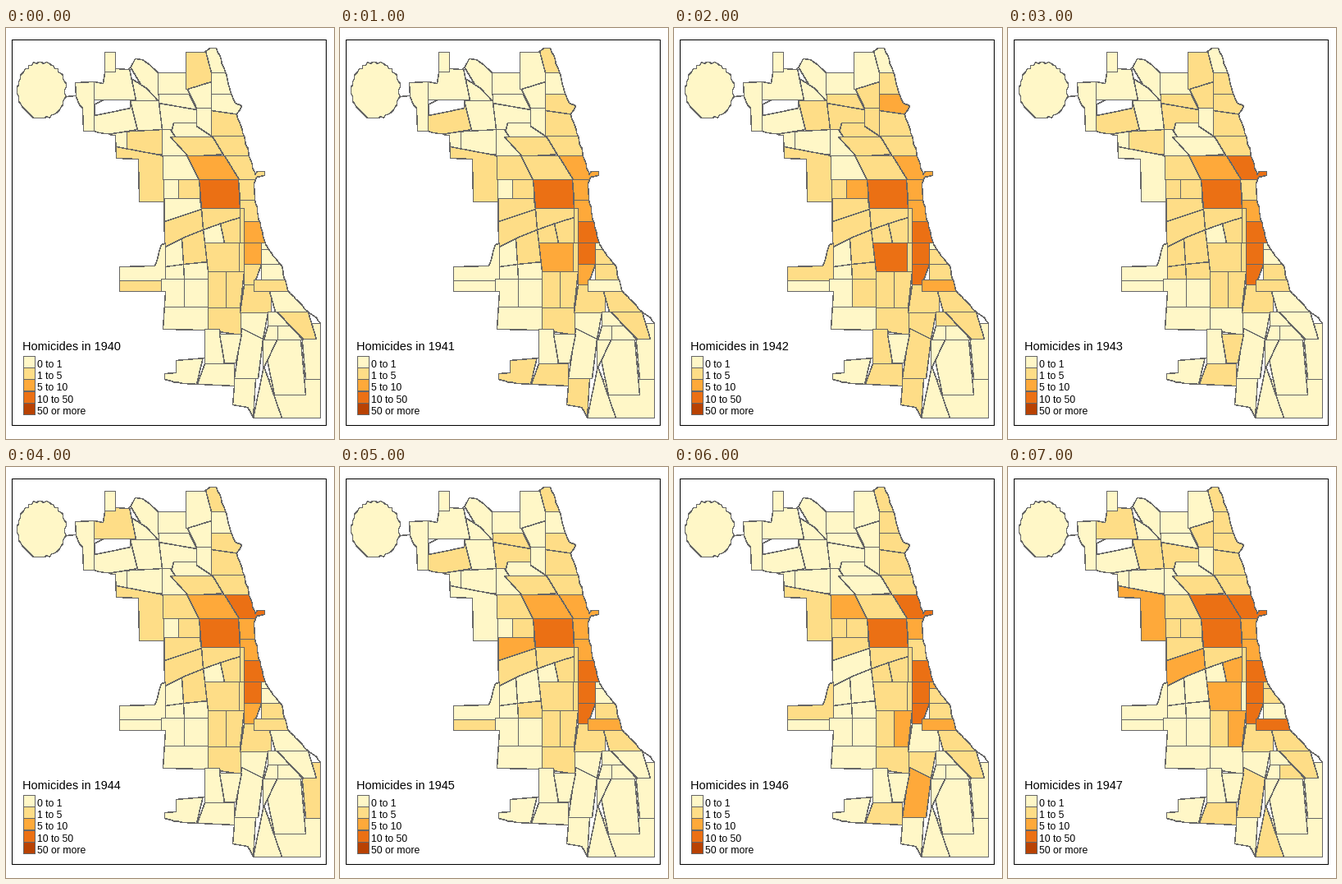
A matplotlib script that plays this animation: 400 px wide and 500 px high, repeating every 8 s.

```python
import numpy as np
import matplotlib.pyplot as plt
from matplotlib.animation import FuncAnimation
from matplotlib.patches import Polygon, Rectangle

PALETTE = ["#FFF7C7", "#FEDD87", "#FEA93A", "#EB7014", "#B84203"]
LABELS = ["0 to 1", "1 to 5", "5 to 10", "10 to 50", "50 or more"]
EDGE = "#666666"
PX = 0.72  # one pixel in points at 100 dpi
THIN = dict(lw=0.4 * PX, aa=False, snap=False)  # drawn one pixel wide
rng = np.random.default_rng(4)

fig = plt.figure(figsize=(4, 5), dpi=100, facecolor="white")
ax = fig.add_axes([0, 0, 1, 1])
ax.set_xlim(0.5, 400.5)
ax.set_ylim(500.5, 0.5)
ax.axis("off")


def add(points, fill, edge=EDGE, **kw):
    return ax.add_patch(Polygon(points, fc=fill, ec=edge, **THIN, **kw))


def box(x, y, w, h, fill, edge):
    ax.add_patch(Rectangle((x, y), w, h, fc=fill, ec=edge, **THIN))


def label(x, y, text, px):
    return ax.text(x, y, text, family="Liberation Sans", size=px * PX)


def roughen(points):
    """Break slanted sides into short, slightly uneven steps."""
    out = []
    for p, q in zip(points, points[1:] + points[:1]):
        (x0, y0), (x1, y1) = p, q
        out.append(p)
        if min(abs(x1 - x0), abs(y1 - y0)) > 3:
            for t in np.arange(5, np.hypot(x1 - x0, y1 - y0) - 3, 5):
                t /= np.hypot(x1 - x0, y1 - y0)
                dx, dy = rng.uniform(-1, 1, 2)
                out.append((x0 + t * (x1 - x0) + dx, y0 + t * (y1 - y0) + dy))
    return out


# City limits, clockwise from the north-west; every district is clipped to them
inland_north = [(85, 67), (108, 66), (119, 68), (121, 55), (121, 30),
                (134, 30), (134, 50), (150, 51), (158, 38), (167, 39),
                (186, 55), (220, 55), (220, 30), (243, 30)]
shore = [(249, 25), (257, 25), (268, 54), (275, 80), (280, 92), (288, 95),
         (282, 105), (291, 132), (297, 157), (304, 179), (307, 175),
         (316, 175), (316, 180), (306, 182), (303, 190), (304, 209),
         (308, 228), (314, 254), (321, 270), (337, 290), (344, 320),
         (369, 346), (379, 353), (384, 360), (384, 475)]
inland_south = [(302, 475), (295, 462), (277, 459), (279, 436), (216, 433),
                (194, 428), (194, 421), (208, 420), (208, 405), (243, 402),
                (243, 368), (192, 367), (195, 321), (139, 321), (139, 291),
                (182, 290), (190, 264), (194, 263), (193, 212), (163, 212),
                (162, 160), (135, 159), (134, 131), (108, 126), (95, 126),
                (94, 98), (86, 84)]
city = add(roughen(inland_north + shore + inland_south), "none", zorder=3)
areas = {}


def row(top, bottom, edges, numbers):
    """Lay districts side by side. An edge given as a pair runs from its
    first x at the top to its second at the bottom; a top or bottom given
    as a pair slopes from the left end to the right end."""
    count = len(edges)
    xs = [np.broadcast_to(e, 2) for e in edges]
    y0, y1 = (np.linspace(*np.broadcast_to(y, 2), count) for y in (top, bottom))
    for i, number in enumerate(numbers):
        j = i + 1
        quad = [(xs[i][0], y0[i]), (xs[j][0], y0[j]),
                (xs[j][1], y1[j]), (xs[i][1], y1[i])]
        areas[number] = add(quad, PALETTE[0])
        areas[number].set_clip_path(city)


# The detached airfield in the north-west and the road to it
turn = np.linspace(0, 2 * np.pi, 60, endpoint=False)
swell = 1 + rng.uniform(-0.04, 0.04, 60)
field = np.c_[44 + 29 * swell * np.cos(turn), 76 + 34 * swell * np.sin(turn)]
add(np.round(field / 2) * 2, PALETTE[0])
add([(73, 84), (86, 83)], "none")

# Districts, by city number; later rows overlap earlier ones
row(60, 127, [80, 108], [76])
row(36, 91, [(145, 178), 187], [12])
row((63, 74), 90, [(155, 152), (172, 187)], [11])
row(50, 88, [108, (151, 159)], [10])
row(30, 54, [119, 134], [9])
row(94, (133, 124), [108, 161], [17])
row(89, 125, [(152, 161), (187, 191)], [15])
row(54, 82, [186, (222, 224)], [13])
row((129, 124), (144, 155), [130, 148, 192], [18, 19])
row((144, 156), 212, [130, 193], [25])

row(91, 124, [(187, 191), 233], [16])
row(81, (92, 100), [187, (224, 233)], [14])
row(116, 133, [(205, 201), 252], [21])
row(124, 157, [191, (201, 223)], [20])
row(133, (157, 154), [(201, 223), (252, 267)], [22])
row(25, 75, [220, 251], [2])
row((75, 66), 98, [(222, 233), 251], [4])
row(98, (120, 132), [233, 251], [5])
row(25, 55, [(243, 251), 290], [1])
row(55, 81, [251, 290], [77])
row(81, 107, [251, 300], [3])
row((101, 108), 132, [251, 300], [6])
row(132, 157, [(252, 267), 310], [7])

row(156, 185, [192, (221, 236), (267, 285), 325], [23, 24, 8])
row(185, 208, [193, 211, 237], [26, 27])
row(185, 220, [(236, 239), (284, 286)], [28])
row(185, 210, [(284, 286), 320], [32])
row(210, 236, [286, 320], [33])
row(208, (236, 221), [194, (237, 239)], [29])
row((236, 221), (267, 246), [194, (239, 241)], [30])
row(220, (246, 231), [(239, 241), 286], [31])
row((246, 231), 262, [(241, 243), (262, 267), 286], [59, 60])
row(220, 262, [286, 291], [34])

row(262, 308, [130, 195], [56])
row(308, 322, [130, 195], [64])
row((267, 246), (291, 285), [195, (215, 217), (241, 246)], [57, 58])
row((291, 285), 306, [195, (217, 218), 247], [62, 63])
row(306, 340, [190, 218, 247], [65, 66])
row(340, 368, [190, 247], [70])
row(262, 297, [(243, 247), 285, 291], [61, 37])
row(297, 341, [247, 269, (291, 286)], [67, 68])
row(341, (368, 374), [247, 287], [71])

row(236, 262, [291, 330], [35])
row(262, 270, [312, 340], [36])
row(262, 288, [291, 312], [38])
row(270, 288, [312, 350], [39])
row(313, 347, [(291, 286), 324], [69])
row(288, 313, [291, (312, 303)], [40])
row(288, 307, [312, 360], [41])
row(321, 346, [(322, 329), 400], [43])
row(307, 321, [303, 360], [42])

row(427, 475, [270, (305, 302)], [53])
row(428, 480, [322, 400], [55])
row(380, 447, [(314, 328), (360, 366)], [51])
row(360, 428, [(360, 366), 400], [52])
row(346, 379, [(331, 363), (369, 379)], [46])
row(346, 363, [320, (331, 347)], [45])
row(363, 380, [(320, 315), 332, (347, 363)], [47, 48])
row(347, (366, 379), [287, (320, 314)], [44])
row(412, 475, [(315, 302), (315, 337)], [54])
row(380, 412, [314, (331, 316)], [50])
row((366, 379), 427, [(288, 279), (314, 308)], [49])
row(367, 410, [243, (261, 267)], [72])
row(373, 408, [(261, 267), (288, 281)], [73])
row(392, 434, [190, (243, 233)], [74])
row(409, 436, [(243, 233), 279], [75])

# Enclave outside the city
add([(109, 93), (120, 88), (152, 88), (152, 98), (124, 104), (109, 107)], "white")

# Usual class of each district, and what departs from it in a year
USUAL = ([], [1, 3, 6, 7, 23, 25, 27, 29, 30, 31, 34, 37, 41, 43, 60, 61, 67,
              68, 69, 71], [24, 32, 33, 42], [8, 28, 35, 38, 40])
DEPART = {
    1940: ([1, 3, 23, 29, 41, 43],
           [2, 8, 19, 22, 32, 33, 40, 42, 46, 58, 64], [35, 38]),
    1941: ([42], [17, 22, 24, 39, 46, 53, 58, 59, 74, 75], [8, 40, 61]),
    1942: ([1, 23], [4, 5, 14, 15, 16, 21, 22, 24, 26, 39, 44, 45, 46, 49, 53,
                     56, 58, 59, 63, 66, 72, 75, 77], [3, 8, 27], [61]),
    1943: ([1, 25, 43, 71], [2, 4, 14, 16, 17, 19, 26, 32, 42, 57, 58, 62, 63,
                             73, 75, 77]),
    1944: ([43], [10, 22, 42, 52, 58], [40]),
    1945: ([25], [14, 16, 17, 22, 63, 64], [8, 29]),
    1946: ([30, 69], [24, 26, 33, 39, 44, 46, 56, 59, 75, 77],
           [23, 36, 49, 68]),
    1947: ([37, 41, 71], [4, 10, 15, 16, 22, 26, 36, 39, 46, 48, 49, 54, 75,
                          77], [25, 30, 60, 61, 68], [24, 42]),
}


def classes(groups):
    return {n: k for k, group in enumerate(groups) for n in group}


# Frame and legend
box(8, 15, 383, 469, "none", "black")
title = label(20.5, 393, "", 14.55)
for k, (fill, text) in enumerate(zip(PALETTE, LABELS)):
    top = round(400 + 14.2 * k)
    box(22, top, 14, 14, fill, EDGE)
    label(39, top + 13.4, text, 12.2)


def draw(i):
    year = 1940 + i
    title.set_text(f"Homicides in {year}")
    level = classes(USUAL) | classes(DEPART[year])
    for number, shape in areas.items():
        shape.set_facecolor(PALETTE[level.get(number, 0)])
    return [title, *areas.values()]


anim = FuncAnimation(fig, draw, frames=8, interval=1000, repeat=True,
                     repeat_delay=0, blit=False)
plt.show()
```
